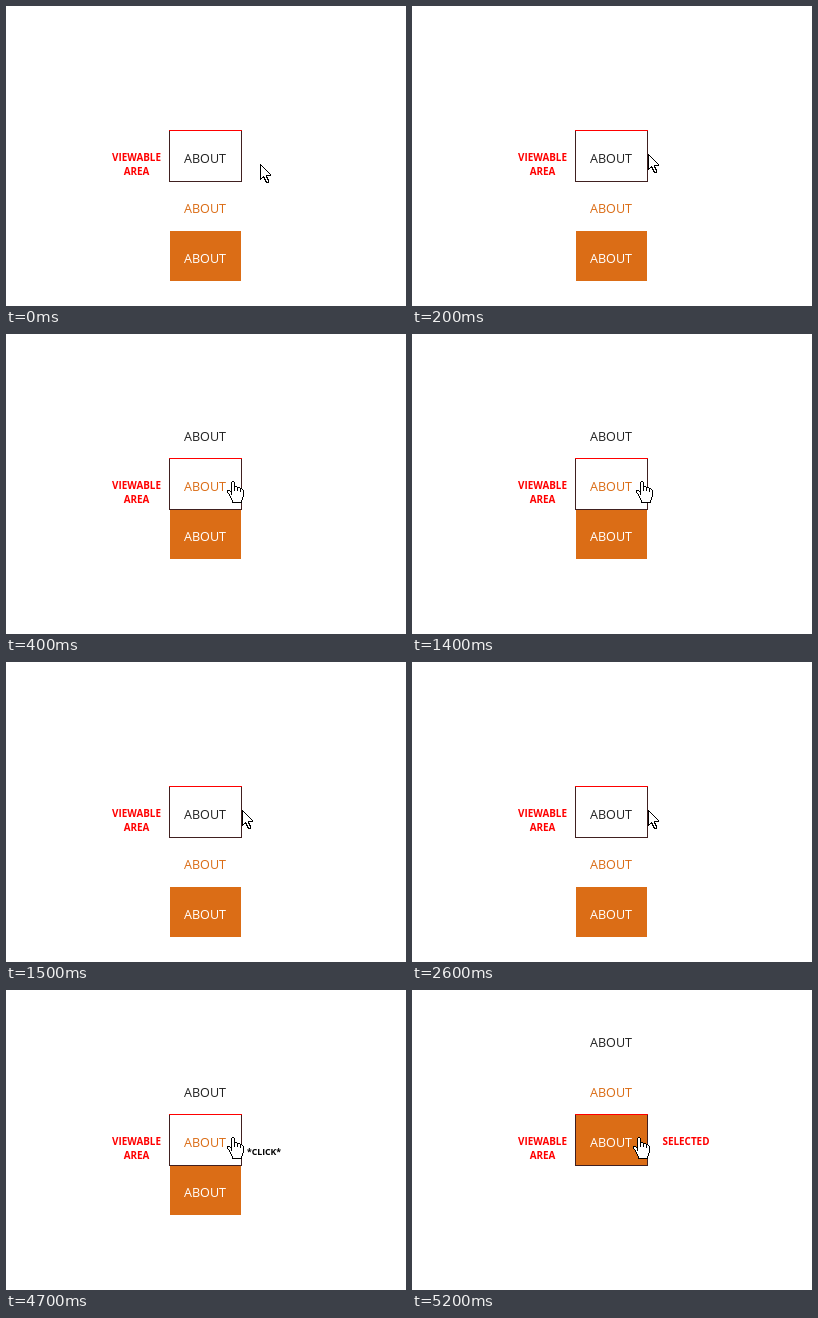
Recreate the animation shown at these times as an HTML page. Size 400 by 300 pixels, loop 7.2 s.

```html
<!DOCTYPE html>
<html>
<head>
<meta charset="utf-8">
<style>
html, body { margin: 0; height: 100%; overflow: hidden; background: #fff; }
svg { display: block; width: 100vw; height: 100vh; font-family: "Open Sans", "Noto Sans", sans-serif; text-anchor: middle; }
.tab { font-size: 12.6px; }
.label { font-size: 9.9px; font-weight: 700; fill: #f00; }
.cursor { fill: #fff; stroke: #000; shape-rendering: crispEdges; }
</style>
</head>
<body>
<svg viewBox="0 0 400 300">
  <g id="strip" class="tab">
    <rect x="164" y="225" width="71" height="50" fill="#db6d16"/>
    <text x="199" y="157" fill="#222">ABOUT</text>
    <text x="199" y="207" fill="#db6d16">ABOUT</text>
    <text x="199" y="257" fill="#fff">ABOUT</text>
  </g>
  <g fill="none" shape-rendering="crispEdges">
    <path d="M163.5 124V175.5H235.5V124" stroke="#402020"/>
    <path d="M163 124.5H236" stroke="#f00"/>
  </g>
  <g class="label">
    <text x="130.5" y="155">VIEWABLE</text>
    <text x="130.5" y="169">AREA</text>
    <text id="selected" x="274" y="155">SELECTED</text>
  </g>
  <text id="click" x="258" y="165" font-size="8.7" font-weight="700">*CLICK*</text>
  <path id="arrow" class="cursor" d="M0 0V15L3 12L6 18H8V16L6 12V11H10V10z"/>
  <path id="hand" class="cursor" d="M5 0H6L7 1V5H9L10 6H12L13 7H14L16 9V15L15 16V18L14 19V21H5V19L4 18V17L3 16V15L2 14V13L0 11V9H2L4 11V1zM4 11V13M7 5V9M10 6V9M13 7V10"/>
</svg>
<script>
const $ = id => document.getElementById(id);
const LOOP = 7200;

// start time, cursor, x, y, strip position
const steps = [
  [0, "arrow", 254, 158, 0],
  [100, "arrow", 243, 152, 0],
  [200, "arrow", 236, 148, 0],
  [300, "hand", 224, 147, 1],
  [400, "hand", 221, 147, 1],
  [1400, "hand", 224, 147, 1],
  [1500, "arrow", 236, 148, 0],
  [1600, "arrow", 243, 152, 0],
  [2600, "arrow", 236, 148, 0],
  [2700, "hand", 221, 147, 1],
  [5200, "hand", 221, 147, 2]
];

function show(id, on) {
  $(id).setAttribute("visibility", on ? "visible" : "hidden");
}

function draw(now) {
  const t = now % LOOP;
  const [, cursor, x, y, pos] = steps.filter(s => s[0] <= t).pop();
  $("strip").setAttribute("transform", `translate(0 ${-50 * pos})`);
  for (const id of ["arrow", "hand"]) show(id, id === cursor);
  $(cursor).setAttribute("transform", `translate(${x + 0.5} ${y + 0.5})`);
  show("click", t >= 4700 && t < 5200);
  show("selected", pos === 2);
}

const start = performance.now();
function tick() {
  draw(performance.now() - start);
  requestAnimationFrame(tick);
}
tick();
</script>
</body>
</html>
```
